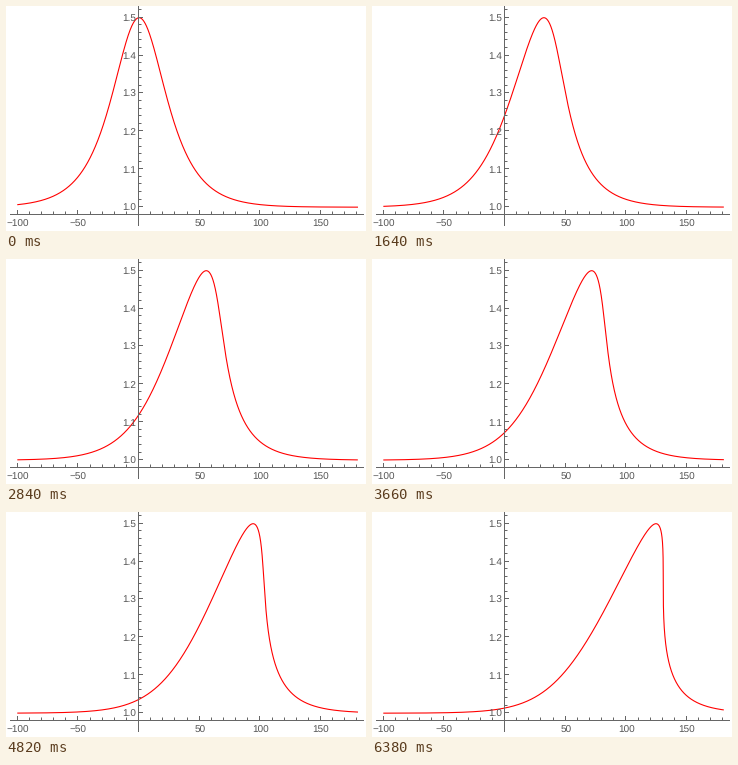
A matplotlib script for the animation above (6400 ms loop, 360 px wide and 225 px high).

```python
import matplotlib.pyplot as plt
import numpy as np
from matplotlib.animation import FuncAnimation

W, H, DPI = 360, 225, 100
FRAMES, STEP_MS = 320, 20
DT, DRIFT = 0.25, 0.06          # model time per frame, background flow
GREY, INK = "#666666", "#555555"
X0, Y1 = 133.1, 201.2           # pixel of x = 0 and of u = 1
SX, SY = 1.213, 379.0           # pixels per unit
AXIS_X, AXIS_Y = 132.5, 208.5


def pt(px):
    return px * 72 / DPI


def to_px(x, u):
    return X0 + SX * x, Y1 - SY * (u - 1)


def crisp(p):
    return np.floor(p - 0.5) + 0.5


plt.rcParams.update({"font.family": "Liberation Sans", "text.hinting": "none"})
fig = plt.figure(figsize=(W / DPI, H / DPI), dpi=DPI, facecolor="white")
ax = fig.add_axes([0, 0, 1, 1])
ax.set(xlim=(0, W), ylim=(H, 0))
ax.axis("off")


def rule(xs, ys):
    ax.plot(xs, ys, color=GREY, lw=pt(1), solid_capstyle="butt",
            snap=False, zorder=3)


def label(x, y, text, ha):
    ax.text(x, y, text, ha=ha, va="baseline", color=INK,
            fontsize=pt(10), zorder=4)


rule([4, 358], [AXIS_Y, AXIS_Y])
rule([AXIS_X, AXIS_X], [0, 220])

for v in range(-100, 181, 10):
    px, _ = to_px(v, 1)
    tick = crisp(px)
    major = v % 50 == 0
    rule([tick, tick], [AXIS_Y, AXIS_Y - (4.5 if major else 3)])
    if major and v:
        label(px, 220.8, str(v).replace("-", "\u2212"), "center")

for k in range(98, 153, 2):
    _, py = to_px(0, k / 100)
    tick = crisp(py)
    major = k % 10 == 0
    rule([AXIS_X, AXIS_X + (4.5 if major else 3)], [tick, tick])
    if major:
        label(130.3, py + 3.5, f"{k / 100:.1f}", "right")

# Steepening wave: each height travels at its own speed.
start = np.linspace(-240, 180, 2401)
u = 1 + 0.5 / np.cosh(start / 20)
curve, = ax.plot([], [], color="red", lw=pt(1.1), zorder=2)


def draw(i):
    x = start + (u + DRIFT) * DT * i
    seen = (x >= -100) & (x <= 180)
    curve.set_data(*to_px(x[seen], u[seen]))
    return curve,


anim = FuncAnimation(fig, draw, frames=FRAMES, interval=STEP_MS,
                     repeat=True, repeat_delay=0, blit=False)
plt.show()
```
